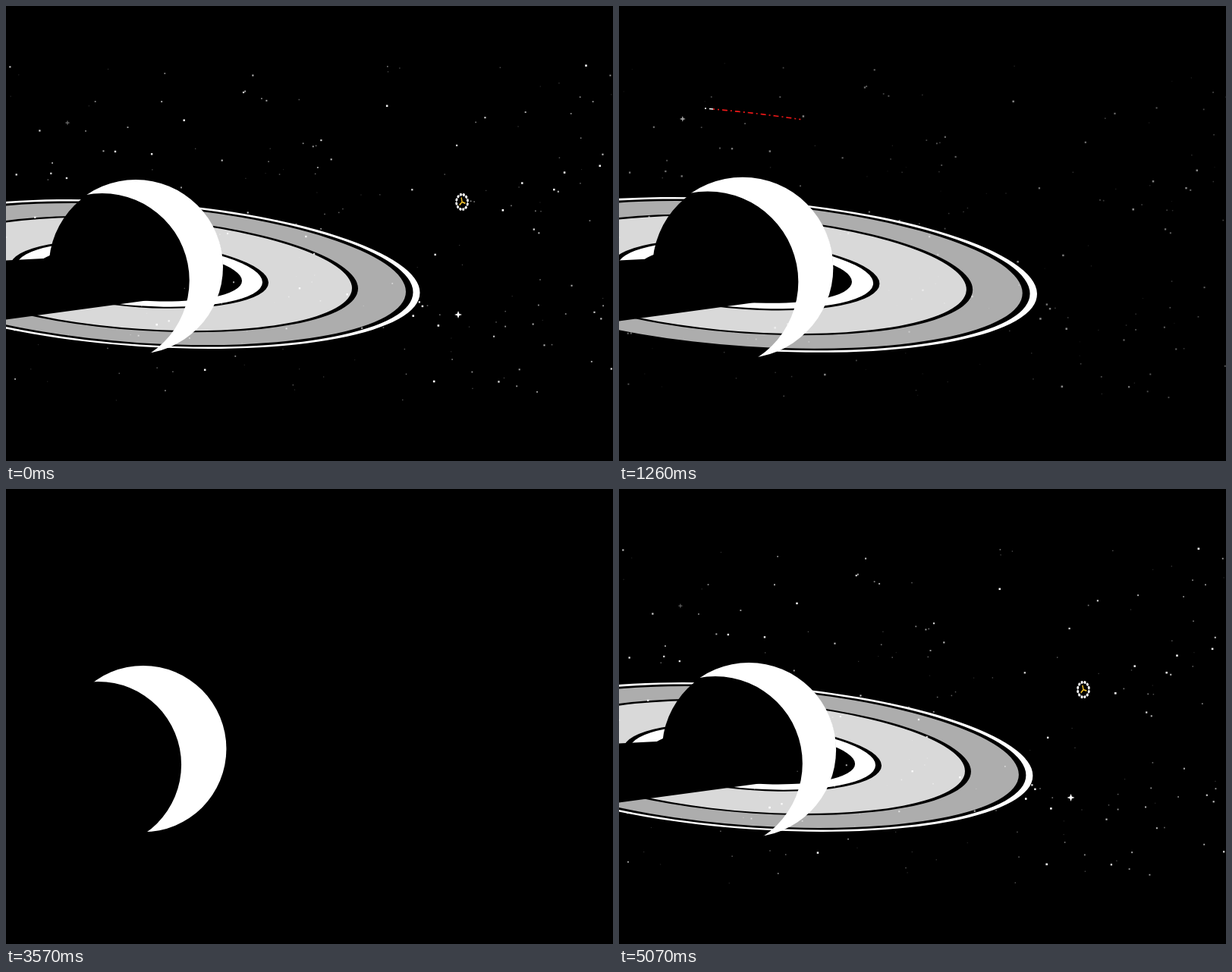
Recreate the animation shown at these times as an HTML page with a canvas. Size 800 by 600 pixels, loop 5.1 s.

```html
<!DOCTYPE html>
<html lang="en">
<head>
<meta charset="utf-8">
<title>Ringed planet</title>
<style>
html, body { margin: 0; width: 100%; height: 100%; overflow: hidden; background: #000; }
canvas { display: block; }
</style>
</head>
<body>
<canvas id="stage" width="800" height="600"></canvas>
<script>
const ctx = document.getElementById('stage').getContext('2d');
const LOOP = 5100, TURN = 2450, TAU = Math.PI * 2;

const clamp = v => Math.max(0, Math.min(1, v));
const ramp = (t, a, b) => clamp((t - a) / (b - a));
const easeQuad = p => p < .5 ? 2 * p * p : 1 - 2 * (1 - p) ** 2;
const easeCubic = p => p < .5 ? 4 * p ** 3 : 1 - 4 * (1 - p) ** 3;

// Smooth curve through [key, value] pairs
function spline(pts, k) {
  const last = pts.length - 1;
  if (k <= pts[0][0]) return pts[0][1];
  if (k >= pts[last][0]) return pts[last][1];
  const slope = i => {
    const a = pts[Math.max(0, i - 1)], b = pts[Math.min(last, i + 1)];
    return (b[1] - a[1]) / (b[0] - a[0]);
  };
  let i = 0;
  while (k > pts[i + 1][0]) i++;
  const [k0, v0] = pts[i], [k1, v1] = pts[i + 1], d = k1 - k0, u = (k - k0) / d;
  return v0 * (1 + 2 * u) * (1 - u) ** 2 + v1 * u * u * (3 - 2 * u) +
    slope(i) * d * u * (1 - u) ** 2 + slope(i + 1) * d * u * u * (u - 1);
}

let seed = 11;
const rnd = () => (seed = (seed * 16807) % 2147483647) / 2147483647;

const stars = Array.from({ length: 230 }, () => {
  const glow = rnd() ** 1.4;
  return { x: rnd() * 818, y: 76 + rnd() * 448, size: 1.1 + 1.5 * glow, alpha: .15 + .85 * glow };
});

// outer radius, inner radius, colour
const rings = [
  [369.5, 360.5, '#fff'], [351, 288, '#adadad'], [280, 170, '#d9d9d9'], [162, 135, '#fff']
];

const flight = [[-950, 825], [-690, 748], [-15, 607], [780, 213], [1150, 98]];

// Height of the flight path at x
function course(x) {
  const u = (x - 113) / 687;
  return 135 + 57 * u + 120 * u ** 2 + 118 * u ** 5;
}

function disc(x, y, r) {
  ctx.beginPath();
  ctx.arc(x, y, r, 0, TAU);
  ctx.fill();
}

function drawRings(t, s) {
  const k = 1 + .032 * s, out = t < TURN;
  ctx.save();
  ctx.transform(k, .0664 * k, 0, .2582 * k, 176 - 7.5 * s, 353.5 + .7 * s);
  rings.forEach(([outer, inner, color], i) => {
    const from = out ? easeQuad(ramp(t, 1005 + 60 * i, 1705 + 60 * i)) : 0;
    const to = out ? 1 : easeQuad(ramp(t, 3630 + 50 * i, 4230 + 50 * i));
    if (from >= to) return;
    const a = Math.PI - TAU * from, b = Math.PI - TAU * to;
    ctx.fillStyle = color;
    ctx.beginPath();
    ctx.arc(0, 0, outer, a, b, true);
    ctx.arc(0, 0, inner, b, a);
    ctx.fill();
  });
  ctx.restore();
}

function sparkle(x, y, r, alpha) {
  ctx.globalAlpha = alpha;
  ctx.beginPath();
  for (let i = 0; i < 8; i++) {
    const d = i % 2 ? r * .38 : r, a = i * TAU / 8;
    ctx.lineTo(x + d * Math.cos(a), y + d * Math.sin(a));
  }
  ctx.fill();
}

function drawStars(t, ms) {
  const fade = t < TURN ? 1 - ramp(t, 950, 1600) : ramp(t, 4150, 4700);
  if (!fade) return;
  const k = 1 + .0000277 * ms;
  const py = y => 300 + (y - 300) * k;
  ctx.fillStyle = '#fff';
  for (const p of stars) {
    ctx.globalAlpha = p.alpha * fade;
    ctx.fillRect(p.x * k - p.size / 2, py(p.y) - p.size / 2, p.size, p.size);
  }
  const right = ramp(ms, -400, -50) * (1 - ramp(ms, 900, 1200));
  const left = ramp(ms, -250, 450) * (1 - ramp(ms, 1050, 1600));
  sparkle(596 * k, py(407), 4 + right, right);
  sparkle(81 * k, py(154), 3 + 1.5 * left, left);
  ctx.globalAlpha = 1;
}

function drawPlanet(t, s) {
  const x = 171 - 6.4 * s, y = 344 + .9 * s, full = 115 + 3.5 * s, k = full / 115;
  const out = t < TURN;
  const r = full * (out ? 1 - ramp(t, 1719, 2374) : ramp(t, 2910, 3310));
  const away = out ? easeCubic(ramp(t, 1742, 2627)) : 1 - easeCubic(ramp(t, 2933, 3818));

  // Shadow cast on the rings
  ctx.fillStyle = '#000';
  ctx.beginPath();
  for (const [u, v] of [[.165, .38], [-2, .675], [-2, -.047], [0, -.15]])
    ctx.lineTo(x + u * full, y + v * full);
  ctx.fill();
  if (r <= 0) return;

  // Dark side hides the far half of the rings only
  ctx.save();
  ctx.beginPath();
  ctx.rect(0, 0, 800, y + .18 * full);
  ctx.clip();
  disc(x, y, r - .5);
  ctx.restore();

  // Lit crescent
  const sx = x - 44.3 * k - 197 * away, sy = y + 18 * k + 44 * away;
  ctx.save();
  ctx.beginPath();
  ctx.rect(0, 0, 800, 600);
  ctx.moveTo(sx + full, sy);
  ctx.arc(sx, sy, full, 0, TAU);
  ctx.clip('evenodd');
  ctx.fillStyle = '#fff';
  disc(x, y, r);
  ctx.restore();
}

function trail(from, to, color, spread = 0) {
  if (to - from < 1) return;
  ctx.strokeStyle = color;
  ctx.lineWidth = 1.6;
  ctx.lineDashOffset = from;
  ctx.beginPath();
  for (let x = from; x < to + 3; x += 3) {
    const u = Math.min(x, to);
    ctx.lineTo(u, course(u) + spread * (u - from));
  }
  ctx.stroke();
}

function drawTrails(ms, x) {
  if (ms < -350) {
    const end = x + 95 * (1 - ramp(ms, -690, -350));
    ctx.setLineDash([6, 2, 3, 2]);
    trail(x + 15, end, '#fff', -.17);
    trail(x + 15, end, '#fff', .17);
  } else if (ms > 200 && ms < 1500) {
    const head = Math.max(113, x + 9), tail = 515 - .573 * Math.max(0, ms - 780);
    const edge = Math.max(head, 515 - 391 * ramp(ms, 850, 1260));
    ctx.setLineDash([7, 4, 2, 4]);
    trail(head, Math.min(edge, tail), '#fff');
    trail(edge, tail, '#f01818');
  }
  ctx.setLineDash([]);
}

function drawShip(ms, x) {
  const size = 1 - ramp(ms, 900, 1150);
  if (!size || ms < -950) return;
  ctx.save();
  ctx.translate(x, course(x) + 1);
  ctx.scale(.76 * size, size);
  const spin = Math.PI / 2 + (ms + 690) * .0012;
  ctx.fillStyle = '#000';
  disc(0, 0, 11);
  ctx.strokeStyle = '#fff';
  ctx.lineWidth = 1;
  ctx.beginPath();
  ctx.arc(0, 0, 9.7, 0, TAU);
  ctx.stroke();
  ctx.lineWidth = 3.6;
  for (let i = 0; i < 12; i++) {
    const a = spin + i * TAU / 12;
    ctx.beginPath();
    ctx.arc(0, 0, 9.9, a - .16, a + .16);
    ctx.stroke();
  }
  ctx.strokeStyle = '#f2c22c';
  ctx.lineWidth = 1.9;
  for (let i = 0; i < 3; i++) {
    const a = spin + i * TAU / 3;
    ctx.beginPath();
    ctx.moveTo(0, 0);
    ctx.lineTo(6 * Math.cos(a), 6 * Math.sin(a));
    ctx.stroke();
  }
  ctx.restore();
}

function draw() {
  const t = performance.now() % LOOP;
  const ms = t < TURN ? t : t - LOOP, s = ms / 1000;
  const shipX = spline(flight, ms);
  ctx.fillStyle = '#000';
  ctx.fillRect(0, 0, 800, 600);
  ctx.save();
  ctx.beginPath();
  ctx.rect(0, 75, 800, 450);
  ctx.clip();
  drawRings(t, s);
  drawStars(t, ms);
  drawPlanet(t, s);
  drawTrails(ms, shipX);
  drawShip(ms, shipX);
  ctx.restore();
  requestAnimationFrame(draw);
}
draw();
</script>
</body>
</html>
```
